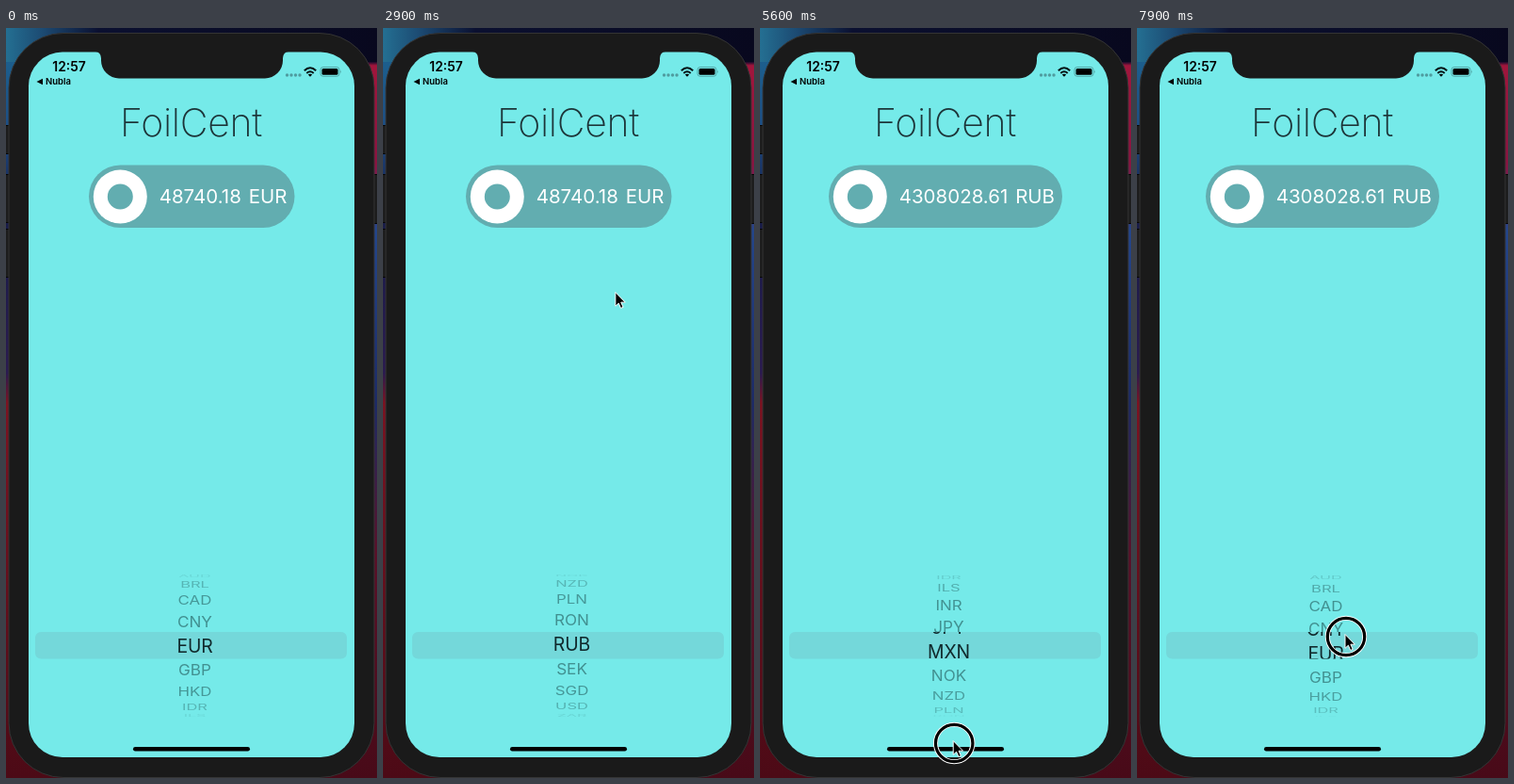
An HTML page for the animation above (8 s loop, 394 by 796 pixels).

```html
<!DOCTYPE html>
<html lang="en">
<head>
<meta charset="utf-8">
<title>Coin rates</title>
<style>
  html, body { margin: 0; width: 100%; height: 100%; overflow: hidden; background: #0a0a20; }
  svg { display: block; width: 394px; height: 796px; font-family: Inter, Roboto, sans-serif; }
  #side text { font-size: 17.2px; text-anchor: middle; fill: #06282a; }
  #mid text { font-size: 19.4px; text-anchor: middle; fill: #10292c; letter-spacing: -.1px; }
  #pill text { font-size: 20.5px; fill: #fff; }
</style>
</head>
<body>
<svg viewBox="0 0 394 796">
  <defs>
    <linearGradient id="left" x2="0" y2="1">
      <stop offset="0" stop-color="#1d6690"/>
      <stop offset=".13" stop-color="#1c4f86"/>
      <stop offset=".25" stop-color="#161b48"/>
      <stop offset=".46" stop-color="#2a1a50"/>
      <stop offset=".5" stop-color="#7c1220"/>
      <stop offset="1" stop-color="#4c0a16"/>
    </linearGradient>
    <linearGradient id="right" x2="0" y2="1">
      <stop offset="0" stop-color="#09091f"/>
      <stop offset=".045" stop-color="#0c0a2a"/>
      <stop offset=".05" stop-color="#a0163c"/>
      <stop offset=".18" stop-color="#8a1440"/>
      <stop offset=".27" stop-color="#23468c"/>
      <stop offset=".5" stop-color="#1c2a66"/>
      <stop offset=".7" stop-color="#5a1028"/>
      <stop offset="1" stop-color="#480a18"/>
    </linearGradient>
    <linearGradient id="top">
      <stop offset="0" stop-color="#246f92"/>
      <stop offset=".1" stop-color="#1c4a72"/>
      <stop offset=".25" stop-color="#0b1030"/>
      <stop offset="1" stop-color="#08081e"/>
    </linearGradient>
    <clipPath id="inBand"><rect x="31" y="641" width="331" height="28.5"/></clipPath>
    <clipPath id="offBand">
      <rect x="31" y="570" width="331" height="71"/>
      <rect x="31" y="669.5" width="331" height="71"/>
    </clipPath>
  </defs>

  <rect width="197" height="796" fill="url(#left)"/>
  <rect x="197" width="197" height="796" fill="url(#right)"/>
  <rect width="394" height="36" fill="url(#top)"/>

  <g fill="#1c1c1c" stroke="#050505">
    <rect x="-3" y="103.5" width="8" height="30" rx="1"/>
    <rect x="-3" y="155.5" width="8" height="51" rx="1"/>
    <rect x="-3" y="213.5" width="8" height="51" rx="1"/>
    <rect x="389" y="155.5" width="8" height="52" rx="1"/>
  </g>
  <rect x="3" y="5.5" width="388" height="790" rx="58" fill="#1a1a1a" stroke="#343434"/>
  <rect x="24" y="25.6" width="346" height="748.5" rx="36" fill="#75eae9"/>
  <path d="M95 25 A6 7 0 0 1 101 32 V34.4 A19 19 0 0 0 120 53.4 H275 A19 19 0 0 0 294 34.4 V32 A6 7 0 0 1 300 25 Z" fill="#1a1a1a"/>

  <text x="49.3" y="46" font-size="13.9" font-weight="600">12:57</text>
  <path d="M32.5 57 L39 53.8 V60.2 Z"/>
  <text x="42" y="60.3" font-size="9.5" font-weight="600">Nubla</text>
  <g fill="#4f9c9f">
    <circle cx="298.5" cy="50" r="1.7"/><circle cx="303" cy="50" r="1.7"/>
    <circle cx="307.5" cy="50" r="1.7"/><circle cx="312" cy="50" r="1.7"/>
  </g>
  <g fill="none" stroke="#061415" stroke-width="2">
    <path d="M316.8 45.3 Q323 39.3 329.2 45.3"/>
    <path d="M319.3 47.9 Q323 44.5 326.7 47.9"/>
  </g>
  <path d="M320.8 49.5 Q323 47.8 325.2 49.5 L323 51.8 Z"/>
  <rect x="334" y="41.5" width="20" height="9.8" rx="2.8" fill="none" stroke="#4fa0a1" stroke-width=".9"/>
  <rect x="335.5" y="43" width="17" height="6.8" rx="1.5"/>
  <path d="M355 44.7 Q356.6 46.4 355 48.1 Z" fill="#4fa0a1"/>

  <text x="196.5" y="115" font-size="41" font-weight="200" letter-spacing="-.3" text-anchor="middle" fill="#1c3438">FoilCent</text>

  <g id="pill">
    <rect id="base" y="145.5" height="66.5" rx="33.25" fill="#62adb0"/>
    <g id="badge">
      <circle cy="179" r="28.5" fill="#fff"/>
      <circle cy="179" r="13.5" fill="#62adb0"/>
    </g>
    <text id="amount" y="186.3"></text>
    <text id="code" y="186.3" text-anchor="end"></text>
  </g>

  <rect x="31" y="641" width="331" height="28.5" rx="6" fill="#74d8da"/>
  <g id="side" clip-path="url(#offBand)"></g>
  <g id="mid" clip-path="url(#inBand)"></g>
  <rect x="135" y="763" width="124" height="4.5" rx="2.25"/>

  <g id="cursor">
    <g id="ring" fill="none">
      <circle cx="1" cy="2.5" r="19.7" stroke="#fff" stroke-width="5"/>
      <circle cx="1" cy="2.5" r="19.7" stroke="#000" stroke-width="3.2"/>
    </g>
    <path d="M0 0 V14.8 L3.4 11.7 L5.7 17 L8.2 15.9 L5.9 10.7 H10.4 Z" stroke="#fff" stroke-width="1"/>
  </g>
</svg>
<script>
const LOOP = 8000, STEP = 100;
const CENTER = { x: 200.5, y: 655.7 }, RADIUS = 75.2, ROW_ANGLE = Math.PI / 9;
const CODES = ('AUD BRL CAD CNY EUR GBP HKD IDR ILS INR JPY MXN NOK NZD ' +
  'PLN RON RUB SEK SGD USD ZAR').split(' ');

// time, wheel position in rows
const WHEEL = [
  [0, 4], [1000, 4], [1300, 6.68], [2200, 14.83], [2500, 15.98], [2800, 16.12], [3000, 16],
  [5000, 16], [5600, 10.75], [5900, 8], [6100, 5.9], [6300, 4.6], [6600, 3.94],
  [6900, 4], [7700, 4], [7900, 3.68]
];
// time, pointer tip x, y
const POINTER = [
  [0, 440, 630], [200, 400, 640], [700, 204, 669], [1000, 203, 669], [1300, 204.5, 598.5],
  [2200, 240, 383.5], [2500, 246, 353], [3200, 247.5, 226], [4100, 247.5, 226],
  [4700, 201, 618], [5000, 201, 618], [5600, 205.2, 756.5], [5900, 206, 830],
  [6600, 420, 830], [6900, 410, 720], [7300, 325, 685], [7600, 221, 635],
  [7700, 221, 635], [7900, 221, 643.5]
];
const PRESSES = [[900, 2500], [4900, 6000], [7700, 8000]];
const RATES = [
  { from: 0, x: 88, w: 218.5, amount: '48740.18', code: 'EUR' },
  { from: 3200, x: 73, w: 248, amount: '4308028.61', code: 'RUB' }
];

const $ = id => document.getElementById(id);

function sample(track, t) {
  const i = track.findIndex(k => k[0] > t);
  if (i < 0) return track[track.length - 1].slice(1);
  const a = track[i - 1], b = track[i], u = (t - a[0]) / (b[0] - a[0]);
  return a.slice(1).map((v, n) => v + (b[n + 1] - v) * u);
}

function addRow(parent, code, size) {
  const row = document.createElementNS('http://www.w3.org/2000/svg', 'text');
  row.textContent = code;
  row.setAttribute('y', size * 0.364);
  return $(parent).appendChild(row);
}

const rows = CODES.map(code => ({
  side: addRow('side', code, 17.2),
  mid: addRow('mid', code, 19.4)
}));

function drawWheel(pos) {
  rows.forEach(({ side, mid }, i) => {
    const angle = (i - pos) * ROW_ANGLE, cos = Math.cos(angle);
    const shown = Math.abs(angle) < Math.PI / 2;
    side.style.display = shown ? '' : 'none';
    mid.style.display = Math.abs(i - pos) < 1.5 ? '' : 'none';
    if (!shown) return;
    const place = `translate(${CENTER.x} ${CENTER.y + RADIUS * Math.sin(angle)})`;
    side.setAttribute('transform', `${place} scale(${0.92 + 0.08 * cos} ${cos})`);
    side.setAttribute('opacity', 0.46 * Math.min(1, cos * 1.2));
    mid.setAttribute('transform', place);
  });
}

function drawPill({ x, w, amount, code }) {
  $('base').setAttribute('x', x);
  $('base').setAttribute('width', w);
  $('badge').setAttribute('transform', `translate(${x + 33.3} 0)`);
  $('amount').setAttribute('x', x + 74.7);
  $('amount').textContent = amount;
  $('code').setAttribute('x', x + w - 8);
  $('code').textContent = code;
}

function drawPointer(t) {
  const [x, y] = sample(POINTER, t);
  const down = PRESSES.some(([a, b]) => t >= a && t < b);
  $('cursor').setAttribute('transform', `translate(${x} ${y})`);
  $('ring').style.display = down ? '' : 'none';
}

const start = performance.now();
function frame(now) {
  const elapsed = Math.max(0, now - start) % LOOP;
  const t = Math.floor(elapsed / STEP) * STEP;
  drawWheel(sample(WHEEL, t)[0]);
  drawPill(RATES.filter(r => r.from <= t).pop());
  drawPointer(t);
  requestAnimationFrame(frame);
}
frame(start);
</script>
</body>
</html>
```
